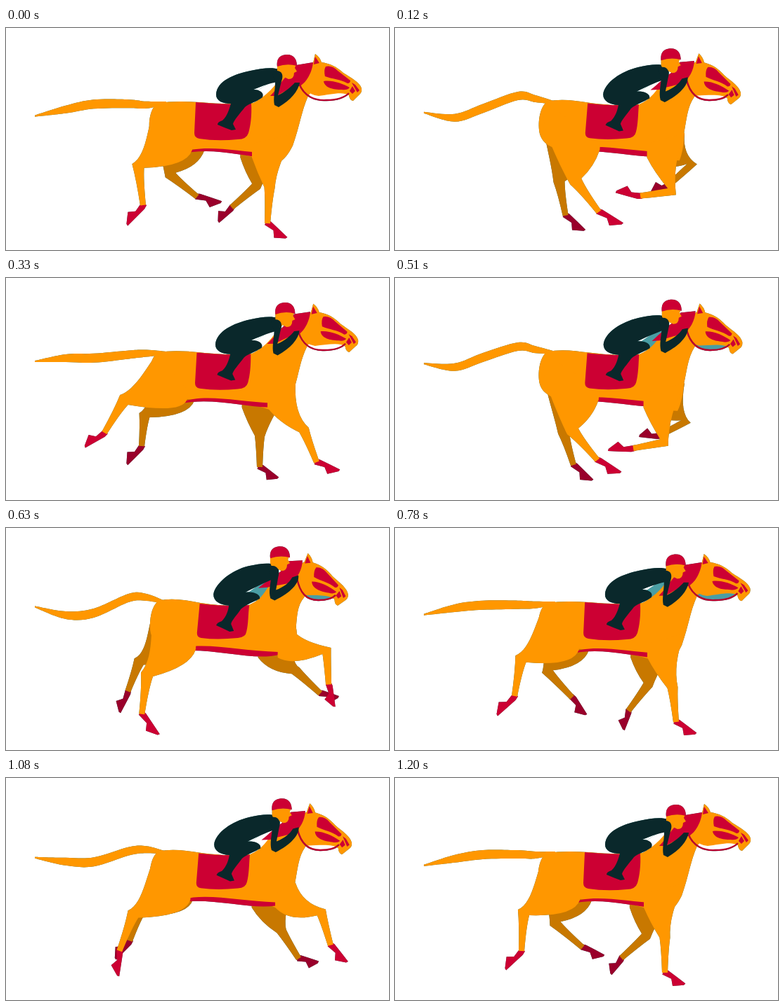
Write an HTML page with a canvas that moves like this. It is 545x317 px and loops after 1.23 s.

```html
<!DOCTYPE html>
<html lang="en">
<head>
<meta charset="utf-8">
<title>Galloping horse</title>
<style>
  html, body { margin: 0; height: 100%; overflow: hidden; background: #fff; }
  canvas { display: block; filter: drop-shadow(0 0 .5px #377); }
</style>
</head>
<body>
<canvas id="stage" width="545" height="317"></canvas>
<script>
const ctx = document.getElementById('stage').getContext('2d');
const ORANGE = '#ff9700', SHADE = '#c87800', RED = '#cc0033', DARK_RED = '#99002b',
      NAVY = '#0a282b', TEAL = '#4a9ea4';
const LOOP = 1230, STEP = 30, STRIDE = 405;
const { min, cos, sin, PI } = Math;

// Leg poses: knee, fetlock and hoof tip at these moments, in 27ths of a stride.
const MOMENTS = [0, 7, 10, 14, 22, 25, 26];
const leg = (pivot, kneeWidth, joints) => ({ pivot, kneeWidth, poses: joints.map(j => toPolar(pivot, j)) });

function toPolar(pivot, joints) {
  const chain = [...pivot, ...joints], pose = [];
  for (let i = 2; i < chain.length; i += 2) {
    const dx = chain[i] - chain[i - 2], dy = chain[i + 1] - chain[i - 1];
    const angle = Math.atan2(dy, dx);
    pose.push(angle < -PI / 2 ? angle + 2 * PI : angle, Math.hypot(dx, dy));
  }
  return pose;
}

const nearHind = leg([232, 150], 9, [
  [188, 197, 195, 253, 173, 281], [253, 219, 288, 260, 321, 277],
  [251, 223, 270, 276, 299, 299], [208, 213, 205, 270, 234, 294],
  [168, 174, 140, 221, 113, 241], [179, 187, 170, 240, 146, 267],
  [183, 192, 180, 247, 158, 273]]);
const farHind = leg([235, 150], 8, [
  [234, 210, 272, 241, 306, 248], [240, 221, 254, 267, 281, 288],
  [214, 210, 212, 261, 238, 281], [190, 192, 174, 235, 167, 266],
  [197, 196, 193, 240, 173, 266], [217, 205, 252, 242, 272, 266],
  [228, 208, 267, 242, 297, 253]]);
const nearFore = leg([385, 150], 7.5, [
  [375, 228, 372, 279, 399, 299], [383, 235, 339, 243, 304, 246],
  [425, 219, 380, 236, 348, 230], [457, 174, 454, 222, 455, 254],
  [424, 217, 442, 263, 474, 274], [395, 228, 400, 277, 428, 293],
  [384, 228, 384, 278, 412, 294]]);
const farFore = leg([380, 150], 7, [
  [356, 226, 321, 256, 303, 277], [414, 205, 376, 225, 348, 226],
  [431, 173, 430, 219, 434, 246], [417, 198, 453, 230, 478, 236],
  [361, 226, 361, 270, 387, 285], [360, 224, 332, 261, 326, 288],
  [357, 226, 322, 257, 308, 280]]);

// Periodic cubic through the poses.
function poseAt(poses, time) {
  const n = MOMENTS.length;
  const when = i => MOMENTS[(i + n) % n] + 27 * Math.floor(i / n);
  const pose = i => poses[(i + n) % n];
  let i = n - 1;
  while (MOMENTS[i] > time) i--;
  const span = when(i + 1) - when(i), s = (time - when(i)) / span;
  return pose(i).map((a, k) => {
    const b = pose(i + 1)[k];
    const slope = j => (pose(j + 1)[k] - pose(j - 1)[k]) / (when(j + 1) - when(j - 1)) * span;
    const m0 = slope(i), m1 = slope(i + 1);
    return a + s * (m0 + s * (3 * (b - a) - 2 * m0 - m1 + s * (2 * (a - b) + m0 + m1)));
  });
}

const along = ([x, y], angle, d) => [x + cos(angle) * d, y + sin(angle) * d];
const side = (p, angle, d) => along(p, angle + PI / 2, d);

function drawLeg({ pivot, kneeWidth, poses }, time, isHind, color, hoofColor, shift = 0) {
  const [a0, d0, a1, d1, a2, d2] = poseAt(poses, time);
  const knee = along(pivot, a0, d0), fetlock = along(knee, a1, d1), shin = along(knee, a1, d1 * .35);
  const [kx, ky] = knee, bend = (a0 + a1) / 2;
  const rear = side(knee, bend, kneeWidth), front = side(knee, bend, -kneeWidth);
  const lower = () => {
    ctx.quadraticCurveTo(...side(shin, a1, 5), ...side(fetlock, a1, 4));
    ctx.lineTo(...side(fetlock, a1, -4));
    ctx.quadraticCurveTo(...side(shin, a1, -5), ...front);
  };

  ctx.fillStyle = hoofColor;
  ctx.save();
  ctx.translate(...fetlock);
  ctx.rotate(a2);
  ctx.scale(d2 / 34, 1);
  ctx.fill(new Path2D('M-3 -4L3 -5Q20 -3 35 -1L34 2L20 11L13 3L-2 4Z'));
  ctx.restore();

  ctx.fillStyle = color;
  ctx.beginPath();
  if (isHind) {
    const flank = 262 + (kx - 180) * .38;
    ctx.moveTo(215, 108);
    ctx.bezierCurveTo(201, 126, min(kx + 16, 175 + kx * .2), min(ky - 14, 180), ...rear);
    lower();
    ctx.quadraticCurveTo(flank - 8, min(198, ky + 20), flank, 174);
    ctx.lineTo(flank + 1, 160);
  } else {
    const elbow = 350 + (kx - 375) * .45 + shift;
    ctx.moveTo(elbow, 165);
    ctx.lineTo(elbow, 185);
    ctx.quadraticCurveTo(elbow + (kx - elbow) * .3, min(206, ky + 22), ...rear);
    lower();
    ctx.quadraticCurveTo(385 + (kx - 375) * .5, min(195, ky - 12), 412, 150);
  }
  ctx.fill();
}

// Shapes in the stretched and the gathered posture.
const SHAPES = {
  body: ['M215 108C235 104 255 105 275 106C310 109 335 109 352 107C365 100 378 90 390 72L437 50L436 90L430 97C420 120 418 140 408 168C402 180 396 188 388 192C380 192 365 188 350 184C330 178 300 172 268 173C240 172 210 170 205 150C201 130 208 112 215 108Z',
         'M217 104C235 99 255 103 277 107C310 112 330 112 346 110C360 104 366 95 372 85L424 48L428 90L424 99C414 110 414 125 413 140C416 152 415 175 412 188C395 188 390 183 386 180C360 186 320 176 276 173C240 180 212 175 206 150C203 130 208 110 217 104Z'],
  mane: ['M413 53L437 49C436 62 428 78 418 83C408 82 395 92 385 97L376 97C385 88 392 76 398 70Z',
         'M402 47L421 46C421 58 414 72 405 77C395 82 385 80 372 84L358 85C372 74 380 68 390 62Z'],
  strap: ['M245 181C275 164 325 176 372 179L372 186C330 182 290 169 245 181Z',
          'M255 170C290 164 340 176 388 177L388 181Q378 185 362 186C330 179 290 173 255 175Z'
            .replace('Q378 185 362 186C330 179 290 173 255 175', 'C355 190 300 173 255 175')],
  saddle: ['M270 106C295 108 325 110 349 108C350 125 348 140 345 150Q342 159 330 159Q300 162 275 158Q268 157 268 150Z',
           'M276 108C300 111 325 112 346 110C344 125 345 135 342 148Q341 156 330 157Q300 160 278 157Q272 156 272 150Z'],
  rein: ['M417 79C424 98 440 104 456 103C470 103 482 99 488 93',
         'M414 72C418 92 426 103 444 103C456 103 464 100 468 96'],
  rider: ['M299 95C300 75 325 66 348 61C365 57 380 56 388 59C396 64 394 72 390 76C380 78 365 82 352 88C362 88 368 93 365 99C358 105 345 108 340 113C333 122 324 132 323 137L327 145L321 146Q310 142 301 138Q301 134 308 132C315 126 318 115 320 108C308 108 299 104 299 95Z',
          'M295 95C297 80 320 60 345 54C360 50 375 49 383 52C390 57 388 65 386 70C375 75 355 84 340 92C352 90 362 95 361 101C352 105 340 110 334 116C328 125 321 132 320 137L324 147L318 148Q308 143 299 139Q300 135 307 133C314 126 316 118 317 111C305 110 295 105 295 95Z'],
  arm: ['M378 62C392 58 396 66 392 76L387 96C395 93 408 82 411 78L418 78C416 90 405 103 388 113L382 110C380 100 383 90 383 78Z',
        'M372 55C386 50 390 60 387 70L384 88C395 84 403 78 407 70L416 67C418 78 405 92 382 103L376 100C373 90 376 80 377 70Z'],
  gap: ['M345 98L390 68L385 90L362 104Z', 'M336 98L384 64L374 92L358 104Z']
};

function morph(name, u) {
  const [low, high] = SHAPES[name], ends = high.match(/\d+/g);
  let i = 0;
  return new Path2D(low.replace(/\d+/g, n => +n + (ends[i++] - n) * u + ' '));
}

function fill(color, path) {
  ctx.fillStyle = color;
  ctx.fill(typeof path === 'string' ? new Path2D(path) : path);
}

// Tail stations: x, middle y, swing, time of the lowest point, half width.
const TAIL = [[228, 107, 0, 0, 2], [200, 104, 6, -15, 5], [175, 103, 7, -48, 6],
              [125, 115, 6.5, 222, 6.5], [85, 121.5, 7.5, 150, 5.5], [41, 119.5, 7, 30, 1]];

function curveThrough(points) {
  points.slice(1).forEach((p, i) => {
    const a = points[i], before = points[i - 1] || a, after = points[i + 2] || p;
    ctx.bezierCurveTo(a[0] + (p[0] - before[0]) / 6, a[1] + (p[1] - before[1]) / 6,
                      p[0] - (after[0] - a[0]) / 6, p[1] - (after[1] - a[1]) / 6, ...p);
  });
}

function drawTail(phase) {
  const edge = sign => TAIL.map(([x, y, swing, peak, half]) =>
    [x, y + swing * cos(2 * PI * (phase - peak) / STRIDE) + sign * half]);
  const top = edge(-1), bottom = edge(1).reverse();
  ctx.fillStyle = ORANGE;
  ctx.beginPath();
  ctx.moveTo(...top[0]);
  curveThrough(top);
  ctx.lineTo(...bottom[0]);
  curveThrough(bottom);
  ctx.fill();
}

function drawHorseHead(u) {
  ctx.save();
  ctx.translate(440 - 11 * u, 37 - u);
  ctx.rotate(.17 * u);
  ctx.translate(-440, -37);
  fill(ORANGE, 'M430 60L437 50L440 37Q447 42 449 49C462 51 470 55 480 64C492 72 503 77 506 86Q507 92 503 95L494 104Q489 103 488 96C480 90 460 95 445 97Q432 96 425 85Z');
  fill(RED, 'M438 52L440 41L446 50Z');
  fill(RED, 'M455 55Q464 53 472 61L490 75Q490 79 486 79C476 73 464 73 454 69Q452 60 455 55Z');
  fill(RED, 'M452 76C464 74 478 79 489 85Q486 89 478 88C466 88 454 86 452 76Z');
  fill(RED, 'M492 78L497 81L503 89L500 92Z');
  fill(RED, 'M493 83L497 90L493 94L489 90Z');
  ctx.restore();
}

function drawRiderHead(u) {
  ctx.save();
  ctx.translate(-10.5 * u, -12.5 * u);
  fill(ORANGE, 'M386 52L413 52L411 57L414 62L410 64Q410 73 402 73L396 70L392 76L386 62Z');
  fill(RED, 'M386 55C384 39 396 38 400 38C410 38 414 45 414 54Q400 50 386 55Z');
  ctx.restore();
}

function draw(now) {
  const t = Math.floor(now % LOOP / STEP) * STEP, phase = t % STRIDE, moment = phase / 15;
  const u = (1 + cos(2 * PI * (moment - 13) / 27)) / 2;
  const gapColor = t >= 510 && t <= 780 ? TEAL : '#fff';
  const rein = morph('rein', u);

  ctx.clearRect(0, 0, 545, 317);
  fill(gapColor, morph('gap', u));
  fill(gapColor, rein);
  drawLeg(farHind, moment, true, SHADE, DARK_RED);
  drawLeg(farFore, moment, false, SHADE, DARK_RED, -8);
  drawTail(phase);
  fill(ORANGE, morph('body', u));
  fill(RED, morph('strap', u));
  drawLeg(nearHind, moment, true, ORANGE, RED);
  drawLeg(nearFore, moment, false, ORANGE, RED);
  fill(RED, morph('saddle', u));
  drawHorseHead(u);
  fill(RED, morph('mane', u));
  ctx.strokeStyle = '#b8002e';
  ctx.lineWidth = 2.4;
  ctx.stroke(rein);
  fill(NAVY, morph('rider', u));
  drawRiderHead(u);
  fill(NAVY, morph('arm', u));
}

const start = performance.now();
(function tick() {
  draw(performance.now() - start);
  requestAnimationFrame(tick);
})();
</script>
</body>
</html>
```
